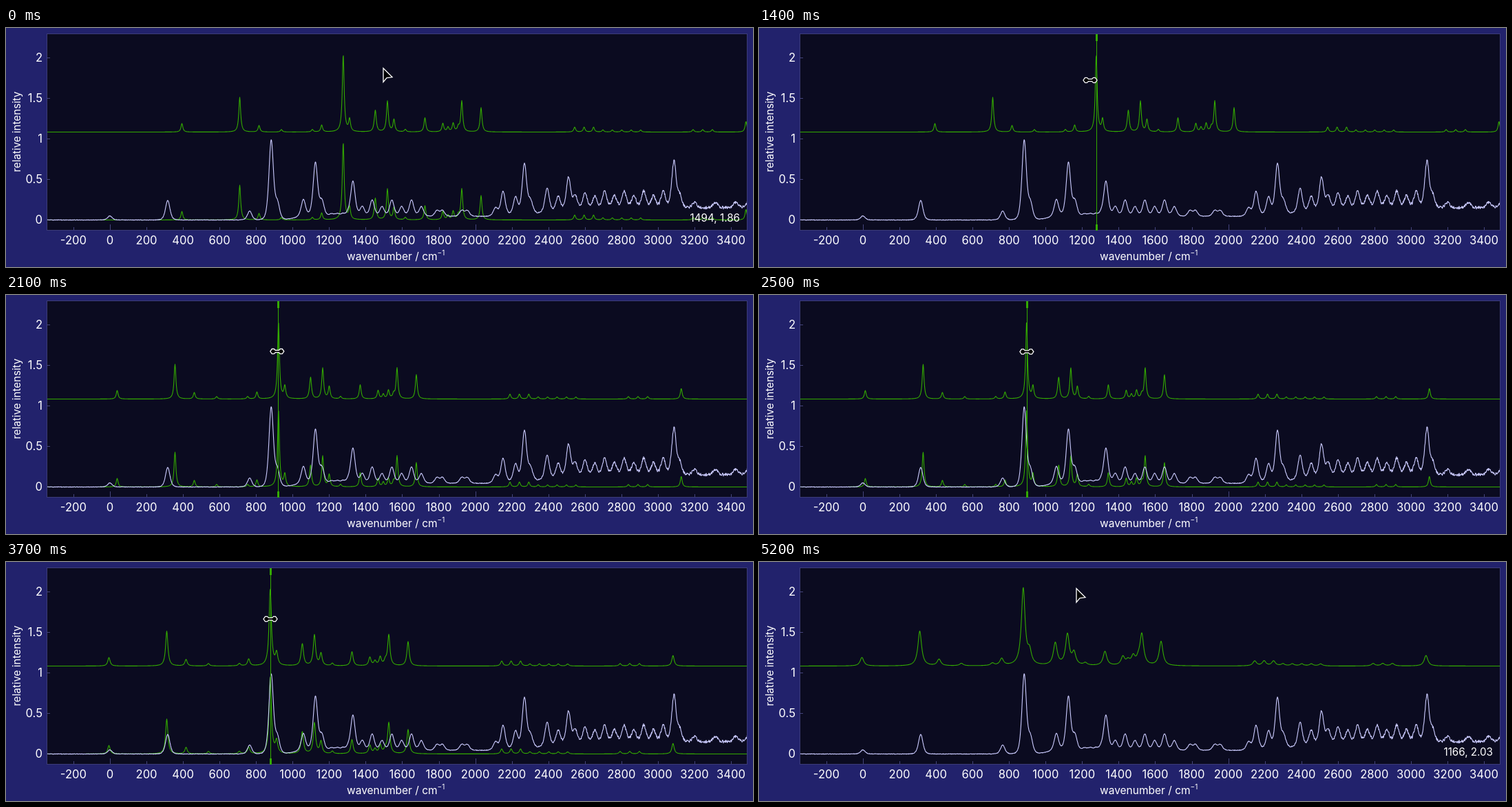
Recreate the animation shown at these times as an HTML page. Size 1085x348 px, loop 5800 ms.

```html
<!DOCTYPE html>
<html lang="en">
<head>
<meta charset="utf-8">
<title>Spectrum alignment</title>
<style>
  html, body { margin: 0; height: 100%; overflow: hidden; background: #22226c; }
  svg { display: block; }
  text { fill: #fff; font: 15.2px Inter, sans-serif; }
  .tick { font-size: 16.6px; }
  .axis { stroke: #44447c; fill: none; }
  .curve { fill: none; stroke: #3a0; stroke-width: 1.1; stroke-linejoin: round; }
  #measured { stroke: #ccf; }
  .pointer { fill: #000; stroke: #fff; stroke-width: 1.3; }
</style>
</head>
<body>
<svg width="1085" height="348" viewBox="0 0 1085 348">
  <rect x="59.5" y="8.5" width="1017" height="286" fill="#0b0b20" stroke="#3c3c78"/>
  <g id="axes"></g>
  <text x="495" y="338" style="font-size:15.5px">wavenumber / cm<tspan
    dy="-7" style="font-size:10px">−1</tspan></text>
  <text transform="translate(21 151) rotate(-90)" text-anchor="middle">relative intensity</text>
  <clipPath id="plot"><rect x="60" y="9" width="1016" height="285"/></clipPath>
  <g clip-path="url(#plot)">
    <path id="upper" class="curve"/>
    <path id="overlay" class="curve"/>
    <path id="measured" class="curve"/>
  </g>
  <g id="handle" stroke="#3a0">
    <path d="M.5 9V295"/>
    <path stroke-width="3" d="M.5 9v10M.5 286v9"/>
  </g>
  <text id="readout" x="1066" y="282" text-anchor="end"></text>
  <path id="arrow" class="pointer" d="M0 0V20L5 14L13 13Z"/>
  <path id="resize" class="pointer"
    d="M-10 0L-7.5 -3.6H-4.5L-2.5 -1.6H2.5L4.5 -3.6H7.5L10 0L7.5 3.6H4.5L2.5 1.6H-2.5L-4.5 3.6H-7.5Z"/>
</svg>
<script>
const LOOP = 5800, STEP = 100;
const LEFT = 60, RIGHT = 1077, X0 = 151, PX_PER_CM = 0.2653, Y0 = 279.5, UNIT = 118;
const GRAB_X = 490, DROP_X = 384, REACH = 17, LIFT = 128 / UNIT;
const PRESS = 14, SETTLE = 22, WIDEN = 36, RELEASE = 48;

// evenly spaced small peaks that alternate in height
const series = (start, step, count, height, swing = 0) =>
  Array.from({ length: count }, (_, i) =>
    [start + i * step, height * (1 + swing * (i % 2 ? 1 : -1))]);

// strong bands seen in both spectra: [x, calculated height, measured height]
const BAND_SHIFT = -104.6;
const bands = [
  [255.5, .105, .05], [339.5, .43, .24], [458.5, .085, .11], [489.8, .92, .98],
  [499, .15, .19], [536.5, .25, .21], [554, .38, .66], [563.5, .15, .18],
  [608.5, .175, .43], [662, .38, 0], [690, .3, 0], [1074.8, .13, .57]
];
const theoryPeaks = [
  ...bands, [367.5, .08], ...series(400, 45, 5, .03), ...series(634.5, 7.5, 4, .08, -.3),
  ...series(826, 13.7, 3, .06), ...series(867, 13.7, 5, .025), ...series(998, 14, 3, .03)
];
const measuredPeaks = [
  ...bands.map(([x, , h]) => [x + BAND_SHIFT, h]),
  ...series(473, 8, 4, .03), ...series(517.5, 14.3, 7, .16, .25),
  ...series(626, 8, 2, .07), ...series(662, 8, 2, .07), [711, .1],
  [722, .3], [740, .22], [753, .62], [762, .15], [786, .3], [802, .19], [817, .41],
  [827, .17], ...series(841, 14.2, 9, .18, -.15), [978.5, .14],
  ...series(1000, 30, 3, .07), [1080, .13]
];
// [step, x, y] of the pointer
const route = [
  [1, 547.4, 59.6], [6, 486, 76], [8, 486, 76], [11, 490, 76], [13, 490, 76],
  [14, 481, 76], [16, 433, 79], [17, 424, 80], [20, 395, 82], [29, 384, 83],
  [47, 384, 83], [49, 399, 74], [52, 460.4, 39.6]
];

const $ = id => document.getElementById(id);
const clamp = v => Math.max(0, Math.min(1, v));
const ramp = (x, a, b) => { const u = clamp((x - a) / (b - a)); return u * u * (3 - 2 * u); };
const show = (id, on) => $(id).setAttribute("visibility", on ? "visible" : "hidden");
const move = (id, x, y) => $(id).setAttribute("transform", `translate(${x} ${y})`);

function plot(id, f, lift = 0) {
  let d = "";
  for (let x = LEFT; x <= RIGHT; x += .5)
    d += (d ? "L" : "M") + x + " " + (Y0 - (f(x) + lift) * UNIT).toFixed(2);
  $(id).setAttribute("d", d);
}

// power 1 is a Lorentzian, higher powers have shorter tails
const sumPeaks = (peaks, x, width, power) => peaks.reduce(
  (sum, [c, h]) => sum + h / (1 + ((x - c) / width) ** 2) ** power, 0);

function measured(x) {
  const hash = Math.sin(x * 127.1) * 43758.5453;
  const noise = (hash - Math.floor(hash) - .5) * (.006 + .032 * ramp(x, 650, 1000));
  const base = .045 * ramp(x, 395, 440) + .105 * ramp(x, 690, 900);
  return base + noise + sumPeaks(measuredPeaks, x, 7.4, 3);
}

function pointerAt(s) {
  const i = route.findIndex(k => k[0] >= s);
  const b = route.at(i), a = i > 0 ? route[i - 1] : b;
  const u = a === b ? 0 : clamp((s - a[0]) / (b[0] - a[0]));
  return [a[1] + (b[1] - a[1]) * u, a[2] + (b[2] - a[2]) * u];
}

function drawAxes() {
  let ticks = "", labels = "";
  for (let cm = -200; cm <= 3400; cm += 200) {
    const x = X0 + cm * PX_PER_CM;
    ticks += `M${Math.round(x) + .5} 294v${cm % 2000 ? -4 : -8}`;
    labels += `<text class="tick" x="${x}" y="315" text-anchor="middle">${cm}</text>`;
  }
  for (let v = 0; v <= 2; v += .5) {
    const y = Y0 - v * UNIT;
    ticks += `M59 ${y}h5`;
    labels += `<text class="tick" x="53" y="${y + 5.5}" text-anchor="end">${v}</text>`;
  }
  $("axes").innerHTML = `<path class="axis" d="${ticks}"/>` + labels;
}

function draw(s) {
  const [x, y] = pointerAt(s);
  const dragging = s >= PRESS && s < RELEASE;
  // the handle trails the pointer during the fast drag, the curve a little more
  const trail = lag => s < PRESS ? GRAB_X : !dragging ? DROP_X
    : pointerAt(s < SETTLE ? s - lag : s)[0];
  const handleX = trail(1), shift = trail(1.1) - GRAB_X;
  const width = 1.6 * (1 + clamp((s - WIDEN) / 4));
  const theory = px => sumPeaks(theoryPeaks, px - shift, width, 1);
  const near = dragging || Math.abs(x - handleX) < REACH;

  plot("upper", theory, LIFT);
  plot("overlay", theory);
  show("overlay", s !== PRESS && s < RELEASE);
  show("handle", near);
  move("handle", Math.round(handleX), 0);
  show("resize", near);
  move("resize", x, y);
  show("arrow", !near);
  move("arrow", x + .6, y - 1);
  show("readout", !dragging);
  $("readout").textContent =
    `${Math.round((x - X0) / PX_PER_CM)}, ${((Y0 - y) / UNIT).toFixed(2)}`;
}

let last = -1;
function tick() {
  const s = Math.floor(performance.now() % LOOP / STEP);
  if (s !== last) draw(last = s);
  requestAnimationFrame(tick);
}

drawAxes();
plot("measured", measured);
tick();
</script>
</body>
</html>
```
